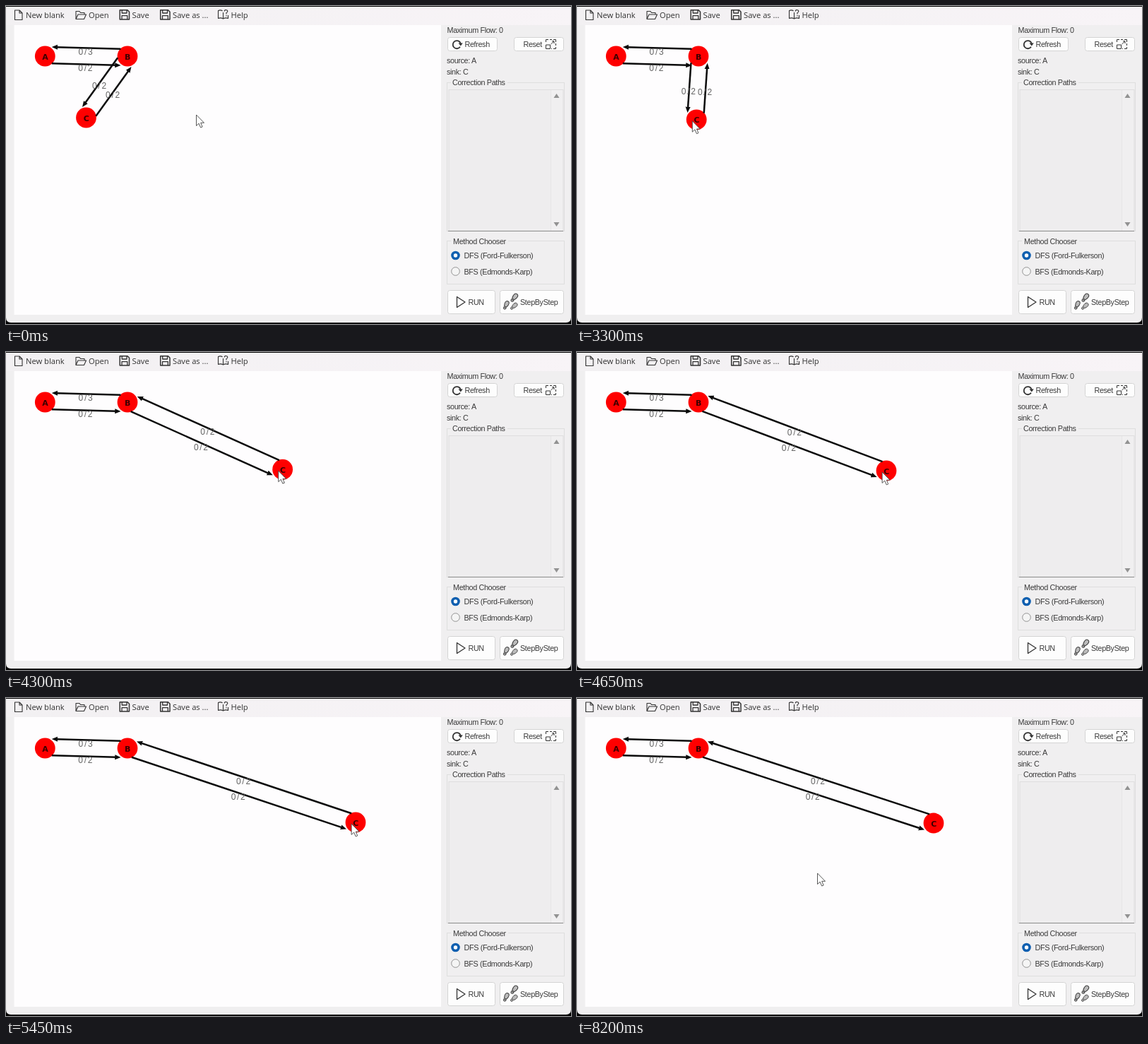
An HTML page for the animation above (8900 ms loop, 800 px wide and 450 px high).

```html
<!DOCTYPE html>
<html lang="en">
<head>
<meta charset="utf-8">
<title>Maximum flow editor</title>
<style>
  html, body { margin: 0; width: 100%; height: 100%; overflow: hidden; background: #f0eff0; }
  svg { display: block; width: 100vw; height: 100vh; }
  .menu { font: 11.2px "Open Sans", "Noto Sans", sans-serif; fill: #333; }
  .panel { font: 10.8px "Liberation Sans", Arial, sans-serif; letter-spacing: -.36px; fill: #3a3a3a; }
  .label { font: 12px "Liberation Sans", Arial, sans-serif; letter-spacing: 1.7px; fill: #636363; text-anchor: middle; }
  .name { font: bold 11px "DejaVu Sans", sans-serif; fill: #3c0000; text-anchor: middle; }
  .icon { fill: none; stroke: #333; stroke-width: 1.1; stroke-linejoin: round; }
  .button { fill: #fdfdfd; stroke: #d4d4d4; }
  .group { fill: none; stroke: #dedede; }
  .edge { stroke: #0c0c0c; stroke-width: 2.5; }
</style>
</head>
<body>
<svg viewBox="0 0 800 450" preserveAspectRatio="none">
  <defs>
    <linearGradient id="bar">
      <stop offset="0" stop-color="#f2f0f2"/>
      <stop offset="1" stop-color="#f8f4f7"/>
    </linearGradient>
    <marker id="head" markerUnits="userSpaceOnUse" markerWidth="10" markerHeight="9" refX="2" refY="4.5" orient="auto">
      <path d="M0 1L8.3 4.5L0 8Z" fill="#0c0c0c"/>
    </marker>
    <g id="floppy" class="icon">
      <path d="M.7 .7H11.5L14 3.2V14H.7Z" stroke-width="1.5"/>
      <path d="M3.7 .7V5H10.5V.7 M3.5 14V8.700H11.300V14" stroke-width="1.300"/>
    </g>
    <g id="shoe" fill="#bbb" stroke="#3a3a3a" stroke-width="1.100">
      <path d="M-2 2.500C-4.500-3-3.500-7.500 0-7.500S4.500-3 2 2.500Z"/>
      <path d="M-2 4H2C2.500 8-2.500 8-2 4Z"/>
    </g>
  </defs>

  <rect width="800" height="450" fill="#000"/>
  <path d="M0 1H800V441Q800 448 793 448H7Q0 448 0 441Z" fill="#f0eff0"/>
  <rect y="1" width="800" height="26" fill="url(#bar)"/>
  <rect x="11.5" y="27" width="604.5" height="410" fill="#fefdfe"/>

  <g class="icon">
    <path d="M12.5 6H19L23 10V19.5H12.5Z M19 6V10H23"/>
    <path d="M99 18.5V7.5H104L105.5 9.5H111V12 M99 18.5L102 12H113.5L110.5 18.5Z"/>
    <path d="M307.5 9V18Q304 16 300.5 17.5V6.5Q304 5 306.5 7 M307.5 18Q311 16 314.5 17.5V13"/>
    <path d="M309 7.5Q310 4.500 313 6Q315 8 312 9.500V11.500 M312 13V14.500"/>
  </g>
  <use href="#floppy" x="160.500" y="5"/>
  <use href="#floppy" x="218" y="5"/>
  <g class="menu">
    <text x="28" y="16.500">New blank</text>
    <text x="117" y="16.500">Open</text>
    <text x="178.500" y="16.500">Save</text>
    <text x="236" y="16.500">Save as ...</text>
    <text x="318.500" y="16.500">Help</text>
  </g>

  <g class="button">
    <rect x="625.5" y="44.5" width="70" height="19" rx="3"/>
    <rect x="719.5" y="44.5" width="70" height="19" rx="3"/>
    <rect x="625.5" y="402.5" width="67" height="33" rx="3"/>
    <rect x="699.5" y="402.5" width="90" height="33" rx="3"/>
  </g>
  <g class="group">
    <rect x="624.5" y="108.5" width="166" height="210"/>
    <rect x="624.5" y="332.5" width="166" height="61"/>
  </g>
  <g fill="#f0eff0">
    <rect x="630" y="104" width="80" height="9"/>
    <rect x="630" y="328" width="81" height="9"/>
  </g>
  <rect x="627" y="118.5" width="162" height="200" fill="#eeedee" stroke="#dedede"/>
  <rect x="771" y="119" width="17" height="199" fill="#f0eff0"/>
  <path d="M771.5 119V318" stroke="#e6e5e6"/>
  <path d="M626 318.5H789" stroke="#8c8c8c"/>
  <path d="M775.5 130L779.5 124L783.5 130Z M775.5 306L779.5 312L783.5 306Z" fill="#929292"/>

  <g fill="none" stroke="#333">
    <path d="M643 57.8A5.6 5.6 0 1 1 643.7 53" stroke-width="1.8"/>
    <path d="M640.5 52.5H646.8L643.8 56.5Z" fill="#333" stroke="none"/>
    <path d="M764.5 51V47.5H768 M770 47.5H773 M775 47.500H778.500V51 M778.500 53V56 M778.500 58V60.500H775 M773 60.500H772"/>
    <path d="M764.500 55H770.500V60.500H764.500Z M771.500 54L776 49.800 M773 49.800H776V53"/>
    <path d="M638.500 411.500L650 419L638.500 426.500Z" stroke-width="1.300" stroke-linejoin="round"/>
  </g>
  <use href="#shoe" transform="translate(719.5 413) rotate(38) scale(.9)"/>
  <use href="#shoe" transform="translate(708 423.5) rotate(25) scale(.85)"/>
  <use href="#shoe" transform="translate(719 425) rotate(48) scale(.8)"/>

  <g class="panel">
    <text x="624.5" y="37.5">Maximum Flow: 0</text>
    <text x="649.5" y="58">Refresh</text>
    <text x="732.5" y="58">Reset</text>
    <text x="624" y="81">source: A</text>
    <text x="624" y="97">sink: C</text>
    <text x="632" y="112">Correction Paths</text>
    <text x="633" y="336.5">Method Chooser</text>
    <text x="648.5" y="357">DFS (Ford-Fulkerson)</text>
    <text x="648.5" y="379.5">BFS (Edmonds-Karp)</text>
    <text x="654.5" y="423">RUN</text>
    <text x="728" y="423">StepByStep</text>
  </g>
  <circle cx="636.5" cy="353" r="6.3" fill="#0f5fb0"/>
  <circle cx="636.5" cy="353" r="2.7" fill="#fff"/>
  <circle cx="636.5" cy="375.5" r="5.8" fill="#f5f5f5" stroke="#929292"/>

  <g id="nodes"></g>
  <g id="edges"></g>
  <path id="cursor" d="M0 0V15.500L3.600 12.200L6.100 18L8.600 17L6.200 11.300H11Z" fill="#fff" stroke="#444" stroke-width=".9" stroke-linejoin="round"/>
</svg>

<script>
const LOOP = 8900, STEP = 50;
const nodes = { A: [55.3, 71], B: [172, 71], C: [113.5, 158] };

// Rows: time in ms, x, y
const dragPath = [
  [2900, 113.5, 158], [3150, 138, 159], [3400, 190, 162], [3700, 270, 164.5],
  [3900, 319.5, 165], [4250, 385, 166], [4650, 438, 168], [5000, 468, 172],
  [5450, 495, 176], [5800, 504.5, 177], [6300, 505, 177]
];
const approach = [1050, 1950, [269.5, 154], [107.7, 160]];
const leave = [7150, 8000, [499, 178.8], [340.5, 248]];

const cursor = document.getElementById("cursor");

function add(parent, tag, attrs, text = "") {
  const el = document.createElementNS("http://www.w3.org/2000/svg", tag);
  for (const key in attrs) el.setAttribute(key, attrs[key]);
  el.textContent = text;
  return parent.appendChild(el);
}

const move = (el, [x, y]) => el.setAttribute("transform", `translate(${x.toFixed(2)} ${y.toFixed(2)})`);
const mix = (a, b, k) => a.map((v, i) => v + (b[i] - v) * k);

const nodeLayer = document.getElementById("nodes");
const shapes = {};
for (const name in nodes) {
  const group = shapes[name] = add(nodeLayer, "g", {});
  add(group, "circle", { r: 14.4, fill: "#fe0000" });
  add(group, "text", { class: "name", x: .3, y: 4.5 }, name);
}

const edgeLayer = document.getElementById("edges");
const edges = [["B", "A", "0/3"], ["A", "B", "0/2"], ["B", "C", "0/2"], ["C", "B", "0/2"]]
  .map(([from, to, flow]) => ({
    from, to,
    line: add(edgeLayer, "line", { class: "edge", "marker-end": "url(#head)" }),
    label: add(edgeLayer, "text", { class: "label" }, flow)
  }));

// Point on a ring around a node, turned away from the direction of its neighbour
function ringPoint([x, y], [tx, ty], radius, turn) {
  const angle = Math.atan2(ty - y, tx - x) + turn * Math.PI / 180;
  return [x + radius * Math.cos(angle), y + radius * Math.sin(angle)];
}

function placeEdge({ from, to, line, label }) {
  const start = ringPoint(nodes[from], nodes[to], 14, 47);
  const tip = ringPoint(nodes[to], nodes[from], 16.2, -53);
  const length = Math.hypot(tip[0] - start[0], tip[1] - start[1]);
  const end = mix(tip, start, 6 / length);
  [["x1", start[0]], ["y1", start[1]], ["x2", end[0]], ["y2", end[1]]]
    .forEach(([key, value]) => line.setAttribute(key, value.toFixed(2)));
  const middle = mix(start, tip, .5);
  move(label, [middle[0] - .3, middle[1] + 9.4]);
}

function along(path, t) {
  if (t <= path[0][0]) return path[0].slice(1);
  const i = path.findIndex(row => row[0] > t);
  if (i < 0) return path[path.length - 1].slice(1);
  const a = path[i - 1], b = path[i];
  return mix(a.slice(1), b.slice(1), (t - a[0]) / (b[0] - a[0]));
}

function glide([begin, end, from, to], t) {
  const k = Math.min(1, Math.max(0, (t - begin) / (end - begin)));
  return mix(from, to, k * k * (3 - 2 * k));
}

function cursorAt(t) {
  if (t < 2900) return glide(approach, t);
  if (t < 7150) return [nodes.C[0] - 5.9, nodes.C[1] + 1.9];
  return glide(leave, t);
}

function draw() {
  const t = Math.floor(performance.now() % LOOP / STEP) * STEP;
  nodes.C = along(dragPath, t);
  for (const name in nodes) move(shapes[name], nodes[name]);
  edges.forEach(placeEdge);
  move(cursor, cursorAt(t));
  requestAnimationFrame(draw);
}
draw();
</script>
</body>
</html>
```
